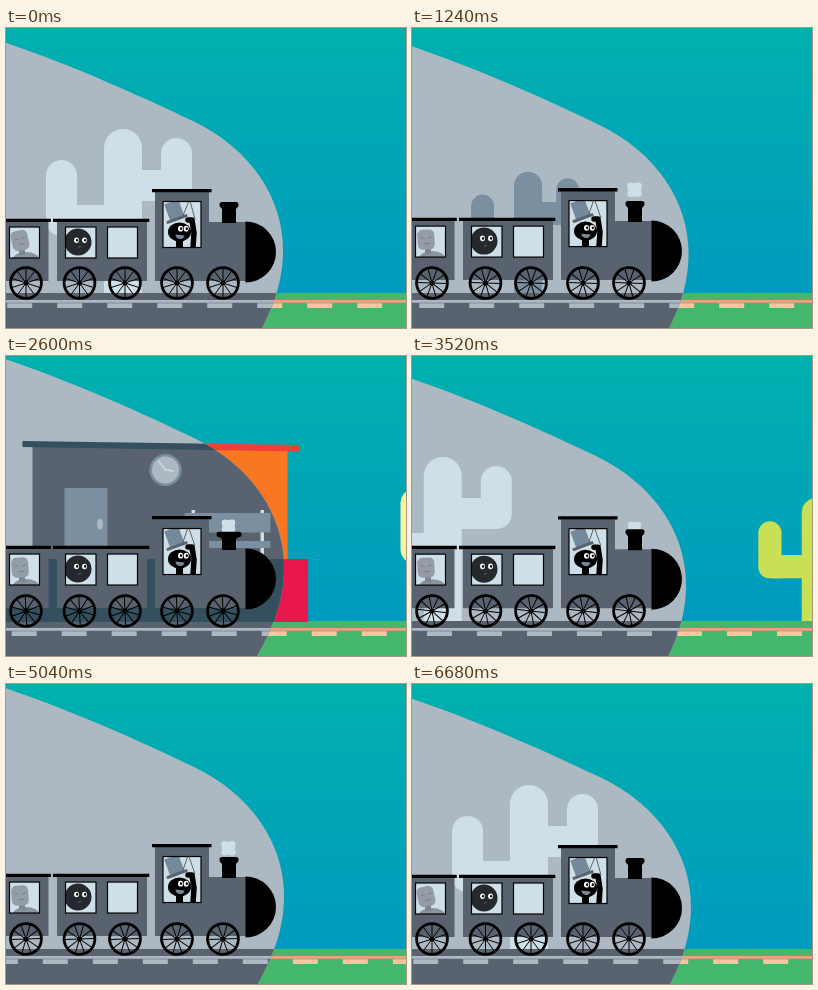
An HTML page with a canvas that plays this animation: 400 px wide and 300 px high, repeating every 6720 ms.

```html
<!DOCTYPE html>
<html lang="en">
<head>
<meta charset="utf-8">
<title>Train ride</title>
<style>
html, body { margin: 0; width: 100%; height: 100%; overflow: hidden; }
canvas { display: block; width: 400px; height: 300px; }
</style>
</head>
<body>
<canvas id="stage" width="400" height="300"></canvas>
<script>
const c = document.getElementById('stage').getContext('2d');
const LOOP = 6720, TRIP = 6680, LAP = 1600;
const SPEED = 2 * LAP / TRIP;
const TAU = Math.PI * 2;

const sky = c.createLinearGradient(0, 0, 0, 300);
sky.addColorStop(0, '#00b0ae');
sky.addColorStop(1, '#0098c0');

const bright = {
  sky, ground: '#44b76c', rail: '#f0a07e', sleeper: '#fcc2a2',
  yellow: '#fff49c', lime: '#c9df56', green: '#8cc152',
  wall: '#f97622', roof: '#ee4135', platform: '#e8174d',
  door: '#fbb040', pale: '#fff49c', clock: '#fcc2a2'
};
const grey = {
  sky: '#acb9c3', ground: '#58636f', rail: '#acb9c3', sleeper: '#acb9c3',
  yellow: '#cfdfe7', lime: '#cfdfe7', green: '#7b8fa1',
  wall: '#58636f', roof: '#34505e', platform: '#34505e',
  door: '#7b8fa1', pale: '#cfdfe7', clock: '#acb9c3'
};
const BODY = '#58636f', GLASS = '#cfdfe7', INK = '#000';

// time, x and y of the shaking beam
const shake = [
  [0, 0, 0], [340, 0, -4], [680, 0, 2], [1000, 0, -6], [1240, -0.5, 3.5],
  [1700, 0, -5], [2080, 0, 0], [2440, 1, -12], [2600, 1, -11], [2860, 0, -2],
  [3160, 0, -13], [3520, -3, 7], [3840, 0, -13], [4160, 0, 0], [4480, 0, -13],
  [4800, 0, -2], [5040, 1, -10], [5480, 0, 2], [5800, -1, -3], [6080, -2, -1],
  [6420, 0, -8], [6720, 2, 1]
];

function shakeAt(t) {
  const i = shake.findIndex(k => k[0] > t);
  const a = shake[i - 1], b = shake[i];
  const p = (1 - Math.cos(Math.PI * (t - a[0]) / (b[0] - a[0]))) / 2;
  return [a[1] + (b[1] - a[1]) * p, a[2] + (b[2] - a[2]) * p];
}

function box(x, y, w, h, color, r = 0) {
  c.fillStyle = color;
  c.beginPath();
  c.roundRect(x, y, w, h, r);
  c.fill();
}

function oval(x, y, rx, ry, color, turn = 0) {
  c.fillStyle = color;
  c.beginPath();
  c.ellipse(x, y, rx, ry, turn, 0, TAU);
  c.fill();
}

function poly(points, color) {
  c.fillStyle = color;
  c.beginPath();
  points.forEach(p => c.lineTo(...p));
  c.fill();
}

function line(points, color, width) {
  c.strokeStyle = color;
  c.lineWidth = width;
  c.beginPath();
  points.forEach(p => c.lineTo(...p));
  c.stroke();
}

function at(x, y, draw, scale = 1, turn = 0) {
  c.save();
  c.translate(x, y);
  c.rotate(turn);
  c.scale(scale, scale);
  draw();
  c.restore();
}

function cactus(x, color, scale) {
  at(x, 265, () => {
    box(0, -164, 38, 164, color, [19, 19, 0, 0]);
    box(-58, -133, 31, 76, color, [15.5, 15.5, 0, 15]);
    box(-40, -88, 45, 31, color);
    box(57, -155, 31, 63, color, [15.5, 15.5, 15, 0]);
    box(33, -123, 40, 31, color);
  }, scale);
}

function station(x, k) {
  at(x, 0, () => {
    box(10, 90, 255, 175, k.wall);
    poly([[0, 85], [277, 89], [277, 95.5], [0, 91]], k.roof);
    oval(143, 114, 16, 16, k.door);
    oval(143, 114, 13.5, 13.5, k.clock);
    line([[136, 105], [143, 114], [151, 115]], k.pale, 1.3);
    box(42, 132, 43, 133, k.door);
    oval(77.5, 168, 3, 5.5, k.clock);
    box(169, 154, 3.5, 50, k.pale);
    box(238, 154, 3.5, 50, k.pale);
    box(162, 157, 86, 19.5, k.door);
    box(162, 185, 86, 7, k.door);
    box(-20, 203, 305.5, 63, k.platform);
  });
}

function scene(k, shift) {
  box(0, 0, 400, 300, k.sky);
  box(0, 265, 400, 35, k.ground);
  const place = (x, draw) => {
    let left = x - shift;
    if (left < -320) left += LAP;
    if (left < 480) draw(left);
  };
  place(98, x => cactus(x, k.yellow, 1));
  place(476, x => cactus(x, k.lime, 0.75));
  place(696, x => cactus(x, k.green, 0.74));
  place(1262, x => station(x, k));
  box(0, 272, 400, 2.7, k.rail);
  for (let x = 1.2 - shift % 50; x < 400; x += 50) {
    box(x, 275.3, 25, 4.7, k.sleeper);
  }
}

function clipToBeam(t) {
  const [x, y] = shakeAt(t);
  c.translate(x, y);
  c.beginPath();
  c.moveTo(-20, 8);
  c.bezierCurveTo(60, 34, 130, 66, 187, 93);
  c.bezierCurveTo(245, 121, 277, 170, 277, 222);
  c.bezierCurveTo(277, 255, 266, 280, 256, 300);
  c.lineTo(243, 325);
  c.lineTo(-20, 325);
  c.closePath();
  c.translate(-x, -y);
  c.clip();
}

function wheel(x, turn) {
  at(x, 255, () => {
    for (let i = 0; i < 5; i++) {
      const a = i * Math.PI / 5, dx = 15 * Math.sin(a), dy = 15 * Math.cos(a);
      line([[-dx, -dy], [dx, dy]], INK, 1);
    }
    c.lineWidth = 2.8;
    c.beginPath();
    c.arc(0, 0, 15.4, 0, TAU);
    c.stroke();
    oval(0, 0, 2.5, 2.5, INK);
  }, 1, turn);
}

// Draws a pane and whoever sits behind it
function pane(x, y, w, h, rider) {
  box(x, y, w, h, GLASS);
  c.save();
  c.beginPath();
  c.rect(x, y, w, h);
  c.clip();
  if (rider) rider();
  c.restore();
  c.strokeStyle = INK;
  c.lineWidth = 1.2;
  c.strokeRect(x, y, w, h);
}

function eyes(x, y, gap, r) {
  for (const ex of [x, x + gap]) {
    oval(ex, y, r, r * 1.15, '#fff');
    oval(ex + 0.6, y, r * 0.45, r * 0.55, INK);
  }
}

function dozer(sway) {
  oval(20, 230, 13, 7, '#8b949d');
  box(13, 218, 6, 8, '#7d8690');
  at(14, 211.5, () => {
    box(-8.5, -10, 17, 20, '#949ca5', 5);
    line([[-5, -2], [-1, -1.5]], '#78818b', 1);
    line([[2, -1.5], [6, -2]], '#78818b', 1);
    line([[-2, 4], [4, 4]], '#78818b', 1);
  }, 1, -0.1 - 0.12 * sway);
}

function gazer(sway) {
  oval(72, 213, 13.5, 13.5, '#25282c');
  eyes(70.5, 210.5 + sway * 0.7, 8, 2.4);
  line([[72, 218], [75, 217.5]], '#58636f', 1);
}

function driver(sway) {
  box(170, 208, 7, 14, INK);
  oval(173.5, 203, 11.5, 9.5, INK);
  at(171, 190, () => {
    box(-7, -18, 15, 18, '#74899b');
    box(-11, -1.5, 22, 3, '#58636f', 1);
  }, 1, -0.35);
  line([[176, 189], [182 + sway, 172]], '#58636f', 1);
  line([[189, 190], [183 + sway, 172]], '#58636f', 1);
  c.lineJoin = c.lineCap = 'round';
  line([[187, 219], [188, 204], [186, 191], [182, 191]], INK, 5.5);
  c.lineJoin = 'miter';
  c.lineCap = 'butt';
  eyes(174.5, 199.7, 5.7, 2.5);
  c.fillStyle = '#74899b';
  c.beginPath();
  c.ellipse(174, 206, 4.5, 4, 0.1, 0, Math.PI);
  c.fill();
}

// Each cycle a puff swells out of the chimney, rises and fades
function puff(p) {
  if (p < 0.3 || p > 0.86) return;
  const rise = Math.min(1, (p - 0.3) / 0.32);
  c.globalAlpha = Math.min(1, (0.86 - p) / 0.1);
  at(222.5, 173 - 13 * rise * rise, () => {
    for (const x of [-3.8, 3.8]) {
      for (const y of [-3.8, 3.8]) oval(x, y, 3.6, 3.6, GLASS);
    }
    box(-6.7, -6.7, 13.4, 13.4, GLASS, 3);
  }, 0.85 + 0.15 * rise);
  c.globalAlpha = 1;
}

function chimney(p) {
  const squash = Math.exp(-(((p - 0.47) / 0.04) ** 2));
  const half = 9.5 + 4 * squash, top = 173 + 3.5 * squash;
  poly([[223 - half, top + 4], [223 + half, top + 4], [230, top + 7],
    [230, 194], [216, 194], [216, top + 7]], INK);
  box(223 - half, top, 2 * half, 5, INK, 2.5);
}

function train(t) {
  const p = t / TRIP * 14 % 1;
  const bob = (1 + Math.cos(TAU * p)) / 2;
  const sway = Math.cos(TAU * t * 7 / TRIP);
  at(0, bob, () => {
    puff(p);
    for (const x of [-98.5, 0]) {
      box(51 + x, 193, 90, 59, BODY);
      box(47 + x, 189.7, 96.3, 3.3, INK);
    }
    pane(3.5, 198, 30, 31, () => dozer(sway));
    pane(59.5, 198, 30.5, 31, () => gazer(sway));
    pane(101.5, 198, 30, 31);
    box(149, 163, 54, 89, BODY);
    box(202, 193, 38, 59, BODY);
    box(146, 160, 59.5, 3.3, INK);
    pane(157, 172.5, 38, 46, () => driver(sway));
    c.fillStyle = INK;
    c.beginPath();
    c.arc(239.5, 223, 30.5, -Math.PI / 2, Math.PI / 2);
    c.fill();
    chimney(p);
  });
  const turn = t / TRIP * 10 * TAU;
  for (const x of [-26, 20, 73.5, 119, 171, 217]) wheel(x, turn);
}

const start = performance.now();

function frame() {
  const t = Math.floor((performance.now() - start) % LOOP / 40) * 40;
  const shift = t * SPEED % LAP;
  scene(bright, shift);
  c.save();
  clipToBeam(t);
  scene(grey, shift);
  c.restore();
  train(t);
  requestAnimationFrame(frame);
}
frame();
</script>
</body>
</html>
```
